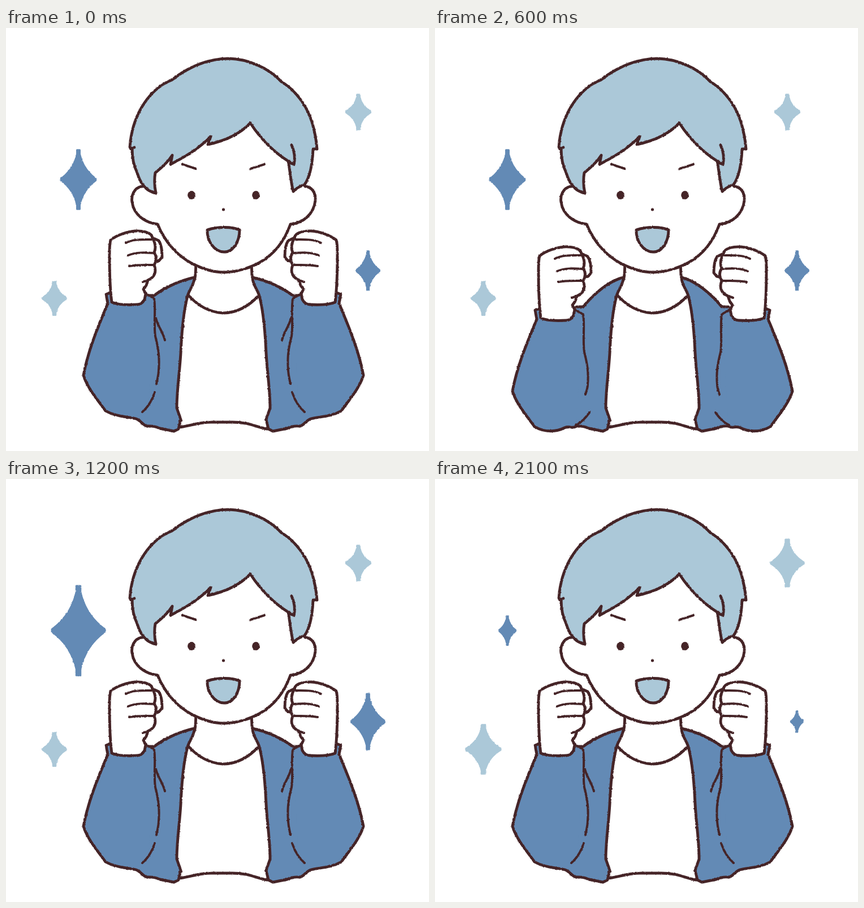
An HTML page for the animation above (2250 ms loop, 748 px wide and 748 px high).

```html
<!DOCTYPE html>
<html lang="en">
<head>
<meta charset="utf-8">
<title>Cheering boy</title>
<style>
  html, body { margin: 0; width: 100%; height: 100%; overflow: hidden; background: #fff; }
  svg { display: block; width: 100%; height: 100%; }
  .ink { fill: none; stroke: #452427; stroke-width: 4.9; stroke-linecap: round; stroke-linejoin: round; }
  .thin { stroke-width: 4; }
  .white { fill: #fff; }
  .pale { fill: #abc8d8; }
  .navy { fill: #638ab5; }
  .dot { fill: #452427; }
</style>
</head>
<body>
<svg viewBox="0 0 748 748">
  <defs>
    <filter id="rough" filterUnits="userSpaceOnUse" x="0" y="0" width="748" height="748" color-interpolation-filters="sRGB">
      <feTurbulence type="fractalNoise" baseFrequency=".3" numOctaves="2" seed="4"/>
      <feColorMatrix values="1 0 0 0 0  0 1 0 0 0  0 0 1 0 0  0 0 0 0 1" result="n"/>
      <feDisplacementMap in="SourceGraphic" in2="n" scale="2.5" xChannelSelector="R" yChannelSelector="G"/>
    </filter>
  </defs>
  <g filter="url(#rough)">
    <g id="stars" stroke-width="3" stroke-linejoin="round"></g>

    <g class="ink">
      <path d="M336 416C335 430 336 437 333 446M434 416L435 438 438 447"/>
      <path d="M321 471C343 496 365 503 384 504C405 504 427 495 449 471"/>
      <path d="M305 706C325 704 340 697 362 697L400 697C430 697 440 705 462 709"/>
    </g>

    <g id="side">
      <path id="panel" class="navy"/>
      <path id="edge" class="ink"/>
      <path id="sleeve" class="navy"/>
      <path id="outer" class="ink"/>
      <path id="inner" class="ink thin"/>
      <path id="foldTop" class="ink thin" d="M265 513C269 529 277 536 281 552"/>
      <path id="foldUp" class="ink thin" d="M263 644Q256 666 241 679"/>
      <path id="foldLow" class="ink thin" d="M273 680Q261 697 249 702"/>
      <g id="fist">
        <path class="ink white" d="M259 371L270 376C275 383 276 395 276 405L271 411 263 413Z"/>
        <path class="ink white" d="M187 485C183 455 183 420 183 400Q183 382 185 375C196 366 215 360 228 359Q248 358 257 366L259 371C264 380 266 388 262 397C267 404 266 412 262 419C267 432 262 441 251 446L248 455 243 462 247 470 245 480Q240 489 232 489C215 490 199 490 187 485Z"/>
        <path class="ink thin" d="M212 380C225 373 242 374 257 374M216 402C230 396 246 397 262 398M218 421C233 418 248 419 262 419M242 449L251 446"/>
      </g>
    </g>
    <use href="#side" transform="matrix(-1 0 0 1 769 0)"/>

    <path class="ink white" d="M240 280C226 283 221 297 223 308C226 330 245 344 268 347C280 376 301 402 330 417C350 427 368 432 385 432C405 432 430 425 448 415C475 400 492 378 503 347C525 345 544 330 547 305C548 293 542 281 529 280"/>
    <path class="ink pale" d="M227 211L222 214 219 211C221 180 230 157 240 140C252 120 270 101 293 92C325 67 360 54 395 54C425 55 462 68 487 95C512 110 531 136 541 166C546 183 549 200 550 214L543 214C542 240 537 264 528 277Q517 280 508 289C503 270 503 255 499 236L509 241C480 226 452 199 432 168C415 186 390 199 357 206L362 192C340 214 318 227 291 241L294 225C286 238 274 248 264 256Q261 273 265 292C250 289 238 277 232 256C224 240 223 225 223 213"/>
    <path class="ink" d="M505 207C509 216 512 229 509 241"/>

    <path class="ink thin" d="M312 241L336 249M432 249L457 241"/>
    <g class="dot">
      <ellipse cx="328" cy="295.5" rx="6.8" ry="7.5"/>
      <ellipse cx="442" cy="295.5" rx="6.8" ry="7.5"/>
      <circle cx="384.5" cy="321" r="2.6"/>
    </g>
    <path class="ink pale" d="M356 357C374 351 400 351 413 357C413 376 403 396 386 396C368 396 355 376 356 357Z"/>
  </g>
</svg>
<script>
const STEP = 150, STEPS = 15, MAX = 4;
const DROP = [0, 14, 35, 35, 28, 14];
const $ = id => document.getElementById(id);
const clamp = v => Math.min(1, Math.max(0, v));

const FRONT = 'M250 704Q262 703 272 708L297 713L305 709L309 692L302 672C302 640 307 610 309 575C311 530 314 500 321 474C324 462 333 455 333 441';
const SHOULDER = 'C308 447 282 458 262 473';
const OUTER = 'M187 467L177 471L180 487C163 528 145 570 137 614C143 635 160 655 176 677C195 688 215 687 230 691C240 695 243 704 250 704';
const INNER = 'M247 468C250 474 258 474 262 479C265 495 261 525 264 545C269 565 272 580 270 604C270 612 268 620 266 629';

const DARK = '#638ab5', PALE = '#abc8d8';
// w, h: largest half size; ease: growth curve; reach: spread of the drops
const STARS = [
  { cx: 128, cy: 268, w: 64.5, h: 107.5, ease: 1, reach: .43, color: DARK },
  { cx: 640, cy: 429, w: 39.5, h: 64.5, ease: .85, reach: .52, color: DARK },
  { cx: 85.5, cy: 478, w: 41.5, h: 58, ease: .9, reach: .75, color: PALE },
  { cx: 623, cy: 148.5, w: 37.5, h: 52.5, ease: .7, reach: .84, color: PALE }
];

// Sizes swing up and down over eight beats; one beat is skipped per loop,
// a step later for the pale stars, which run opposite to the dark ones
function levelAt(step, color) {
  const skip = color === DARK ? 8 : 9;
  const beat = step + (step >= skip);
  const level = Math.abs(MAX - (beat + 6) % 8);
  return color === DARK ? level : MAX - level;
}

function spark({ cx, cy, w, h, ease, color }, level) {
  const size = (level / MAX) ** ease;
  const a = w * size - 1.5, b = h * size - 1.5;
  const tip = a * (color === DARK ? .08 : .11);
  const corner = (sx, sy, flip) => {
    const pts = [[tip, b], [tip, b * .86], [a * .28, b * .34], [a, b * .03]]
      .map(([x, y]) => `${cx + sx * x} ${cy + sy * y}`);
    return flip ? `L${pts[3]}Q${pts[2]} ${pts[1]}L${pts[0]}` : `L${pts[0]}L${pts[1]}Q${pts[2]} ${pts[3]}`;
  };
  const path = corner(1, -1) + corner(1, 1, true) + corner(-1, 1) + corner(-1, -1, true);
  return 'M' + path.slice(1) + 'Z';
}

// Four small drops around the centre
function burst({ cx, cy, w, h, reach }) {
  return [[1, 0], [0, 1], [-1, 0], [0, -1]].map(([ux, uy]) => {
    const l = 6, r = 2.7;
    const at = (a, b) => `${cx + ux * (w * reach + a) - uy * b} ${cy + uy * (h * reach + a) + ux * b}`;
    return `M${at(-l, 0)}C${at(0, r)} ${at(l, r)} ${at(l, 0)}C${at(l, -r)} ${at(0, -r)} ${at(-l, 0)}Z`;
  }).join('');
}

// Lowers each point of a path by its own share of the drop
function sag(path, drop, share) {
  return path.replace(/(\d+) (\d+)/g, (_, x, y) => `${x} ${+y + drop * share(+x, +y)}`);
}

const set = (id, name, value) => $(id).setAttribute(name, value);
const show = (id, on) => set(id, 'opacity', on ? 1 : 0);

function drawArms(drop) {
  const outer = sag(OUTER, drop, (x, y) => y < 600 ? 1 : clamp((250 - x) / 36));
  const edge = FRONT + sag(SHOULDER, drop, x => clamp((308 - x) / 65)) + `L250 ${473 + drop * .72}`;
  set('panel', 'd', edge + 'Z');
  set('edge', 'd', edge);
  set('outer', 'd', outer);
  set('sleeve', 'd', `${outer}L262 ${479 + drop}L247 ${468 + drop}Z`);
  set('inner', 'd', sag(INNER, drop, (x, y) => clamp((690 - y) / 90)));
  for (const id of ['fist', 'foldTop']) set(id, 'transform', `translate(0 ${drop})`);
  show('foldTop', drop < 20);
  show('foldUp', drop === 0);
  show('foldLow', drop > 0 && drop < 35);
}

function draw(step) {
  for (const star of STARS) {
    const level = levelAt(step, star.color);
    star.el.setAttribute('d', level ? spark(star, level) : burst(star));
    star.el.setAttribute('stroke', level ? star.color : 'none');
  }
  drawArms(DROP[step] || 0);
}

for (const star of STARS) {
  star.el = document.createElementNS('http://www.w3.org/2000/svg', 'path');
  star.el.setAttribute('fill', star.color);
  $('stars').append(star.el);
}

let last = -1;
function tick() {
  const step = Math.floor(performance.now() / STEP) % STEPS;
  if (step !== last) draw(last = step);
  requestAnimationFrame(tick);
}
tick();
</script>
</body>
</html>
```
